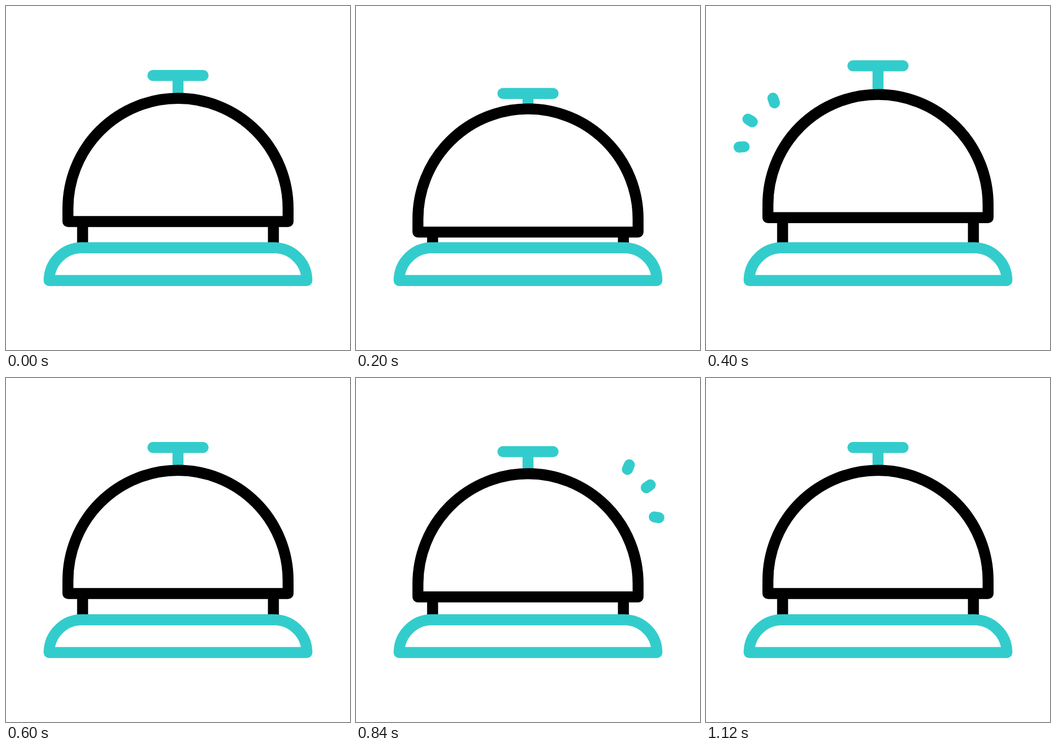
Write an HTML page that moves like this. It is 640x640 px and loops after 1480 ms.

```html
<!DOCTYPE html>
<html lang="en">
<head>
<meta charset="utf-8">
<title>Desk bell</title>
<style>
  html, body { margin: 0; width: 100%; height: 100%; overflow: hidden; background: #fff; }
  svg { display: block; width: 100%; height: 100%; }
  path { fill: none; stroke-width: 20.4; stroke-linejoin: round; }
  .teal { stroke: #3cc; }
  .black { stroke: #000; }
  .round { stroke-linecap: round; }
</style>
</head>
<body>
<svg viewBox="0 0 640 640">
  <path class="black" d="M142.5 395V448M497.5 395V448"/>
  <g id="knob">
    <path class="teal" d="M320 129.3V185"/>
    <path class="teal round" d="M273.3 129.3H366.7"/>
  </g>
  <path id="dome" class="black" style="fill:#fff"
        d="M115.2 376.6A204.8 204.8 0 0 1 524.8 376.6V401H115.2Z"/>
  <path class="teal" d="M80.2 510.8A61 61 0 0 1 141.2 449.8H498.8A61 61 0 0 1 559.8 510.8Z"/>
  <path id="rays" class="teal round"/>
</svg>
<script>
  const LOOP = 1480, STEP = 40;
  const knob = document.getElementById('knob');
  const dome = document.getElementById('dome');
  const rays = document.getElementById('rays');

  // Each ray runs from its inner end to its outer end: [x1, y1, x2, y2]
  const bursts = [
    { head: [200, 400], tail: [280, 440], lines: [
      [136, 206.5, 124.5, 171.5], [110.5, 230.5, 78, 210.5], [99, 260, 61.5, 262.5]] },
    { head: [680, 800], tail: [760, 880], lines: [
      [498, 187, 508.5, 161.5], [525, 214.5, 547.5, 198.8], [538, 256, 563.5, 259.8]] }
  ];

  // Piecewise linear tracks of [time, value]
  const track = (down, up) => [
    [40, 0], [200, down], [360, up], [400, up], [600, 0],
    [760, down], [920, up], [1120, 0]
  ];
  const knobTrack = track(33.4, -18);
  const domeTrack = track(19.6, -7.2);

  const progress = (t, [from, to]) => Math.min(1, Math.max(0, (t - from) / (to - from)));

  function valueAt(keys, t) {
    let value = keys[0][1];
    for (let i = 1; i < keys.length; i++) {
      const [t0, v0] = keys[i - 1], [t1, v1] = keys[i];
      if (t >= t0) value = v0 + (v1 - v0) * progress(t, [t0, t1]);
    }
    return value;
  }

  function rayPath(t) {
    let d = '';
    for (const { head, tail, lines } of bursts) {
      const a = progress(t, tail), b = progress(t, head);
      if (b <= a) continue;
      for (const [x1, y1, x2, y2] of lines) {
        const point = k => `${x1 + (x2 - x1) * k} ${y1 + (y2 - y1) * k}`;
        d += `M${point(a)}L${point(b)}`;
      }
    }
    return d;
  }

  function render(t) {
    knob.setAttribute('transform', `translate(0 ${valueAt(knobTrack, t)})`);
    dome.setAttribute('transform', `translate(0 ${valueAt(domeTrack, t)})`);
    rays.setAttribute('d', rayPath(t));
  }

  const start = performance.now();
  function tick() {
    const t = (performance.now() - start) % LOOP;
    render(Math.floor(t / STEP) * STEP);
    requestAnimationFrame(tick);
  }
  tick();
</script>
</body>
</html>
```
